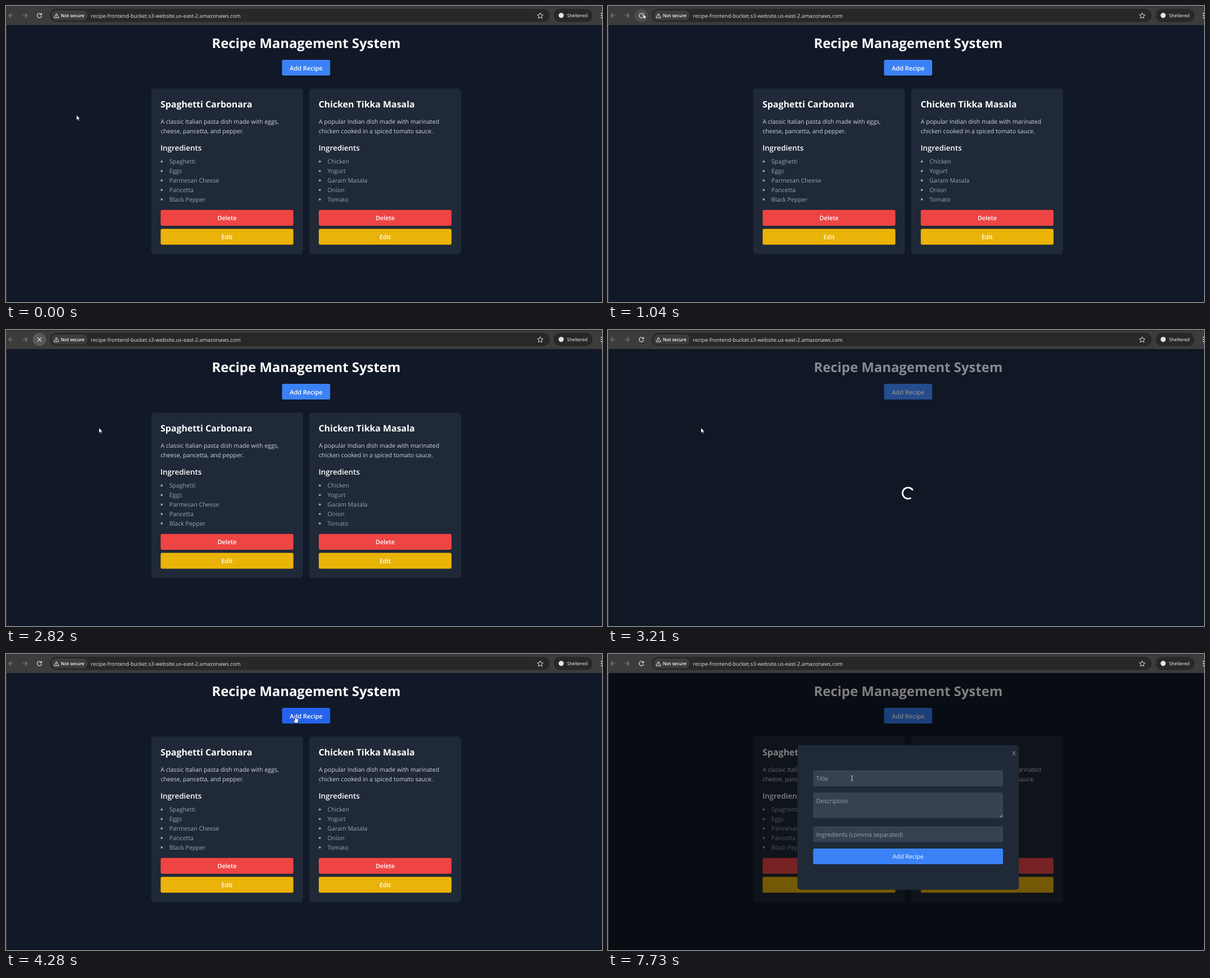
An HTML page for the animation above (8000 ms loop, 1061 by 528 pixels).

```html
<!DOCTYPE html>
<html lang="en">
<head>
<meta charset="utf-8">
<title>Recipe Management System</title>
<style>
  html, body { margin: 0; width: 100%; height: 100%; overflow: hidden; background: #111827; }
  svg { display: block; width: 100%; height: 100%; }
  text { font: 10.6px "Open Sans", "Noto Sans", sans-serif; fill: #fff; text-rendering: geometricPrecision; white-space: pre; }
  .mid { text-anchor: middle; }
  .line { fill: none; stroke: #e3e3e3; stroke-width: 1.2; }
  .off { stroke: #7c7c7c; }
  .h1 { font-size: 23.9px; font-weight: 700; }
  .h2 { font-size: 15.9px; font-weight: 700; }
  .h3 { font-size: 13.4px; font-weight: 600; }
  .btn { font-size: 10.9px; font-weight: 600; }
  .desc { fill: #d1d5db; }
  .item { fill: #9ca3af; }
  .url { font-size: 9.36px; fill: #e3e3e3; }
  .chip { font-size: 8px; font-weight: 600; }
  .tip { font-size: 7px; fill: #e3e3e3; }
</style>
</head>
<body>
<svg viewBox="0 0 1061 528">
  <rect width="1061" height="528" fill="#111827"/>

  <g id="page">
    <text class="h1 mid" x="534.4" y="75">Recipe Management System</text>
    <rect id="add" x="491.4" y="96" width="85.7" height="28.1" rx="2.8"/>
    <text class="btn mid" x="534.4" y="114.6">Add Recipe</text>
    <g id="cards"></g>
  </g>

  <g id="loader">
    <rect y="34" width="1061" height="494" fill="#111827" opacity=".5"/>
    <circle id="ring" cx="534.2" cy="291" r="9.9" fill="none" stroke="#fff" stroke-width="2.8" pathLength="4" stroke-dasharray="3 1"/>
  </g>

  <g id="modal">
    <rect y="34" width="1061" height="494" opacity=".5"/>
    <rect x="337.2" y="162.5" width="394.2" height="258" rx="5.6" fill="#1f2937"/>
    <text class="item mid" x="722.5" y="181">X</text>
    <g fill="#374151">
      <rect x="365.2" y="207.5" width="338" height="28.5" rx="2.8"/>
      <rect x="365.2" y="247" width="338" height="45.5" rx="2.8"/>
      <rect x="365.2" y="307.5" width="338" height="28" rx="2.8"/>
    </g>
    <path class="line" style="stroke-width:.8" d="M697.5 291.5l5-5m-2.2 5l2.2-2.2"/>
    <text class="item" x="370.8" y="226.3">Title</text>
    <text class="item" x="370.8" y="265.7">Description</text>
    <text class="item" x="370.8" y="326">Ingredients (comma separated)</text>
    <rect x="365.2" y="347" width="338" height="28.1" rx="2.8" fill="#3b82f6"/>
    <text class="mid" style="font-weight:500" x="534.4" y="365.4">Add Recipe</text>
  </g>

  <g id="toolbar">
    <rect y="34" width="1" height="494" fill="#444"/>
    <rect width="1061" height="34" fill="#3c3c3c"/>
    <rect width="1061" height="1" fill="#262626"/>
    <path class="line off" d="M13.2 17H5m4-4l-4 4 4 4M29.6 17h8.2m-4-4l4 4-4 4"/>
    <circle id="halo" cx="59.5" cy="17" r="11.8"/>
    <path id="reload" class="line" d="M62.5 14.4A4 4 0 1 0 63.4 17.8M63.3 12.4v3.2h-3.2"/>
    <path id="stop" class="line" d="M56.2 13.7l6.6 6.6m0-6.6l-6.6 6.6"/>
    <rect x="78" y="5" width="890" height="23.5" rx="11.7" fill="#282828"/>
    <rect x="81" y="8" width="64.5" height="17.5" rx="8.7" fill="#3c3c3c"/>
    <path class="line" style="stroke-width:1" d="M85.4 21L89.8 13.2 94.2 21ZM89.8 15.8v2.6m0 .7v1"/>
    <text class="chip" x="97.8" y="19.7">Not secure</text>
    <text class="url" x="151.1" y="20.5">recipe-frontend-bucket.s3-website.us-east-2.amazonaws.com</text>
    <path class="line" style="stroke-width:1" d="M951 12.2l1.5 3.3 3.6.4-2.7 2.4.8 3.6-3.2-1.9-3.2 1.9.8-3.6-2.7-2.4 3.6-.4Z"/>
    <rect x="975" y="5" width="69" height="23.5" rx="11.7" fill="#282828"/>
    <circle cx="988.3" cy="16.8" r="4.6" fill="#e3e3e3"/>
    <text style="font-size:8.2px" x="998.8" y="19.8">Sheltered</text>
    <g fill="#e3e3e3">
      <circle cx="1060" cy="13" r="1.1"/><circle cx="1060" cy="17" r="1.1"/><circle cx="1060" cy="21" r="1.1"/>
    </g>
  </g>

  <g id="tooltip">
    <rect x="62.5" y="28.5" width="80" height="14" fill="#2b2b2b" stroke="#555" stroke-width=".7"/>
    <text class="tip" x="66" y="38">Stop loading this page</text>
  </g>

  <g id="pointer" stroke="#111" stroke-width=".6">
    <path id="arrow" fill="#fff" d="M0 0V9L2.1 7.2 3.6 10.5 5 9.9 3.6 6.7H6.4Z"/>
    <path id="hand" fill="#fff" d="M-.9 0Q0-1 .9 0V4L4.6 5Q5.6 5.4 5.4 7L4.6 12H-.3L-3.2 7.8Q-2.6 6.6-.9 8Z"/>
    <path id="beam" fill="none" stroke="#ddd" stroke-width=".9" d="M-2-4.2H-.6L0-3.7.6-4.2H2M0-3.7V3.7M-2 4.2H-.6L0 3.7.6 4.2H2"/>
  </g>
</svg>
<script>
const $ = id => document.getElementById(id);
const show = (id, on) => $(id).style.display = on ? '' : 'none';

const recipes = [
  ['Spaghetti Carbonara', 'A classic Italian pasta dish made with eggs,', 'cheese, pancetta, and pepper.',
    ['Spaghetti', 'Eggs', 'Parmesan Cheese', 'Pancetta', 'Black Pepper']],
  ['Chicken Tikka Masala', 'A popular Indian dish made with marinated', 'chicken cooked in a spiced tomato sauce.',
    ['Chicken', 'Yogurt', 'Garam Masala', 'Onion', 'Tomato']]
];
const label = (cls, x, y, s) => `<text class="${cls}" x="${x}" y="${y}">${s}</text>`;
const button = (y, fill, s) =>
  `<rect x="16.9" y="${y}" width="236.3" height="28.1" rx="2.8" fill="${fill}"/>` + label('btn mid', 135.1, y + 18.6, s);

$('cards').innerHTML = recipes.map(([name, line1, line2, items], i) =>
  `<g transform="translate(${258.4 + i * 281.5})">
    <rect y="147" width="270.1" height="295.6" rx="5.6" fill="#1f2937"/>` +
  label('h2', 16.6, 181.4, name) + label('desc', 16.9, 210.3, line1) + label('desc', 16.9, 227.2, line2) +
  label('h3', 16.6, 258.3, 'Ingredients') +
  items.map((s, k) => `<circle cx="18.8" cy="${277.4 + k * 16.9}" r="1.9" fill="#9ca3af"/>` +
    label('item', 32.4, 281 + k * 16.9, s)).join('') +
  button(363.8, '#ef4444', 'Delete') + button(397.6, '#eab308', 'Edit') + '</g>').join('');

// Pointer moves: start, end, steps, then curve start, control and end points
const moves = [
  [370, 1040, 12, [125.5, 194.5], [75, 130], [62.5, 14]],
  [2540, 2820, 6, [62.5, 14], [135, 60], [165.5, 174.5]],
  [4110, 4280, 4, [165.5, 174.5], [340, 130], [515, 111]],
  [7320, 7730, 8, [515, 111], [480, 160], [434.5, 221.5]]
];

function pointerAt(t) {
  const [from, to, n, a, b, c] = moves.filter((m, i) => !i || t >= m[0]).pop();
  const step = Math.floor((t - from) / (to - from) * (n - 1) + 1e-6) + 1;
  const k = Math.min(Math.max(step / n, 0), 1);
  const u = k * k * (3 - 2 * k);
  return a.map((v, i) => v * (1 - u) ** 2 + 2 * b[i] * u * (1 - u) + c[i] * u * u);
}

const inside = ([x, y], l, t, r, b) => x >= l && x <= r && y >= t && y <= b;

function draw(t) {
  const p = pointerAt(t);
  const modal = t >= 6600, loading = t >= 3210 && t < 3340, stopping = t >= 2100 && t < 3210;
  const overAdd = !modal && inside(p, 491, 96, 577, 124);
  const overField = modal && inside(p, 365, 207, 703, 236);

  show('modal', modal);
  show('loader', loading);
  show('cards', !loading);
  show('reload', !stopping);
  show('stop', stopping);
  show('tooltip', t >= 2100 && t < 2540);
  show('halo', t < 3210 && (t >= 1470 || inside(p, 48, 5, 71, 29)));
  $('halo').setAttribute('fill', t < 1470 ? '#4d4d4d' : t < 1540 ? '#555' : t < 1850 ? '#646464' : '#595959');
  $('add').setAttribute('fill', overAdd ? '#2563eb' : '#3b82f6');
  $('ring').setAttribute('transform', `rotate(${59 + (t >= 3270 ? 22 : 0)} 534.2 291)`);

  show('hand', overAdd);
  show('beam', overField);
  show('arrow', !overAdd && !overField);
  $('pointer').setAttribute('transform', `translate(${p})`);
}

const begin = performance.now();
function tick() {
  draw((performance.now() - begin) % 8000);
  requestAnimationFrame(tick);
}
tick();
</script>
</body>
</html>
```
